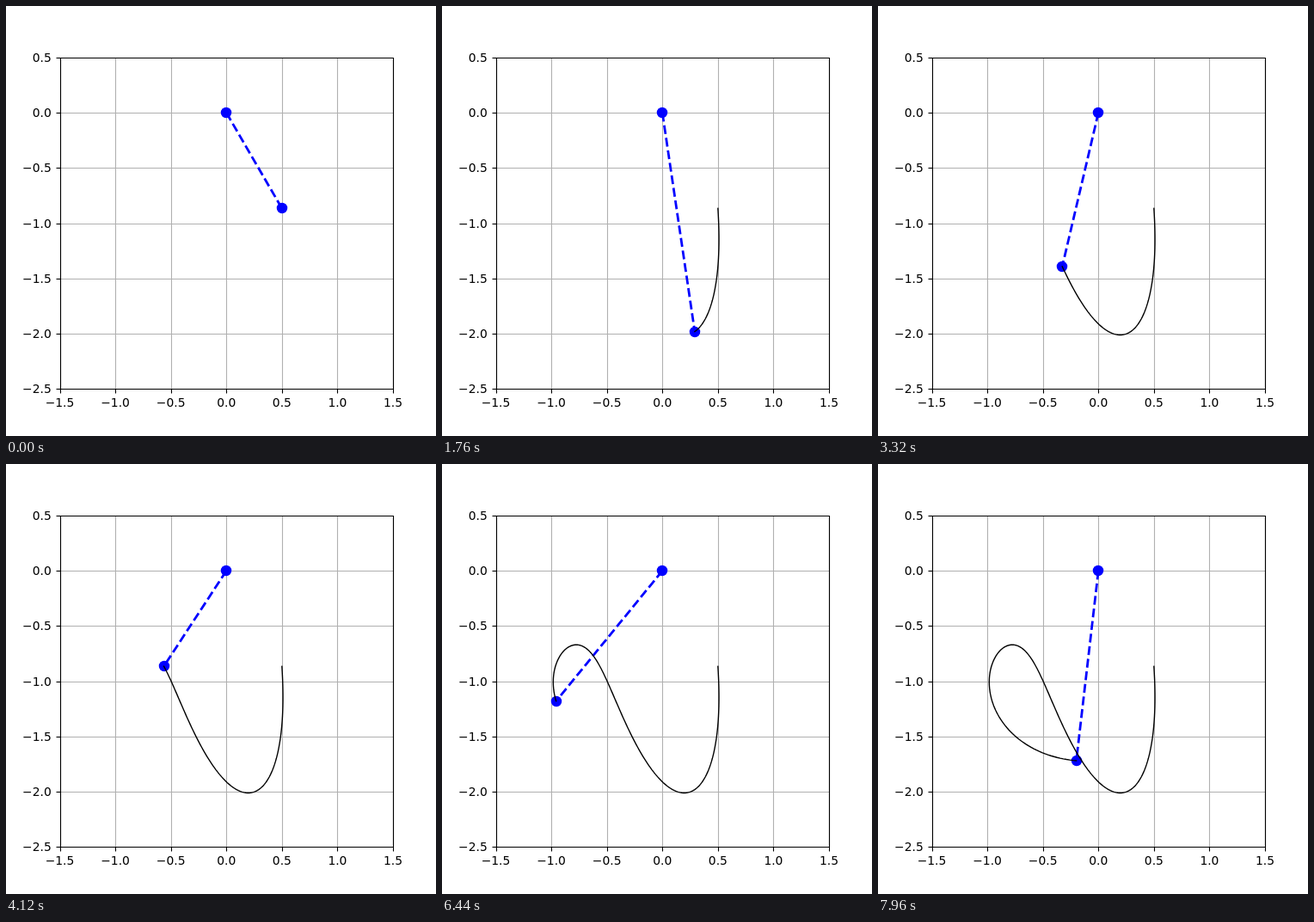
An HTML page with a canvas that plays this animation: 500 px wide and 500 px high, repeating every 8 s.

```html
<!DOCTYPE html>
<html lang="en">
<head>
<meta charset="utf-8">
<title>Spring pendulum</title>
<style>
  html, body { margin: 0; width: 100%; height: 100%; overflow: hidden; background: #fff; }
  canvas { display: block; }
</style>
</head>
<body>
<canvas id="stage" width="500" height="500"></canvas>
<script>
const ctx = document.getElementById('stage').getContext('2d');

const FRAME_MS = 40, FRAMES = 200;
const PT = 100 / 72; // pixels per point
const LEFT = 62.5, RIGHT = 450, TOP = 60, BOTTOM = 445;

const toX = x => LEFT + (x + 1.5) * (RIGHT - LEFT) / 3;
const toY = y => TOP + (0.5 - y) * (BOTTOM - TOP) / 3;
const snap = v => Math.round(v + 1e-6) + 0.5;

// Unit mass on a spring of rest length 1, integrated with velocity Verlet.
function simulate() {
  const gravity = 9.81, stiffness = 24, substeps = 20, dt = 0.01 / substeps;
  const angle = Math.PI / 6, radialSpeed = 2, angularSpeed = -1;
  const sin = Math.sin(angle), cos = Math.cos(angle);
  let x = sin, y = -cos;
  let vx = radialSpeed * sin + angularSpeed * cos;
  let vy = -radialSpeed * cos + angularSpeed * sin;

  const kick = () => {
    const pull = stiffness * (1 - 1 / Math.hypot(x, y));
    vx -= pull * x * dt / 2;
    vy -= (pull * y + gravity) * dt / 2;
  };

  const points = [];
  for (let i = 0; i < FRAMES; i++) {
    points.push([toX(x), toY(y)]);
    for (let s = 0; s < substeps; s++) {
      kick();
      x += vx * dt;
      y += vy * dt;
      kick();
    }
  }
  return points;
}

const path = simulate();
const pivot = [toX(0), toY(0)];

function line(points, color, width, dash = [], cap = 'butt') {
  ctx.strokeStyle = color;
  ctx.lineWidth = width;
  ctx.lineCap = cap;
  ctx.lineJoin = 'round';
  ctx.setLineDash(dash);
  ctx.beginPath();
  points.forEach(p => ctx.lineTo(...p));
  ctx.stroke();
}

function dot([x, y]) {
  ctx.fillStyle = '#00f';
  ctx.beginPath();
  ctx.arc(Math.round(x), Math.round(y), 4.5 * PT, 0, 2 * Math.PI);
  ctx.fill();
}

function drawAxes() {
  const thin = 0.8 * PT, tick = 5;
  const label = v => v.toFixed(1).replace('-', '\u2212');
  const left = snap(LEFT), right = snap(RIGHT), top = snap(TOP), bottom = snap(BOTTOM);
  ctx.font = `${10 * PT}px "DejaVu Sans", sans-serif`;
  ctx.textBaseline = 'alphabetic';

  for (let i = 0; i <= 6; i++) {
    const vx = -1.5 + i / 2, vy = 0.5 - i / 2;
    const x = snap(toX(vx)), y = snap(toY(vy));
    line([[x, top], [x, bottom]], '#b0b0b0', thin);
    line([[left, y], [right, y]], '#b0b0b0', thin);
    line([[x, bottom], [x, bottom + tick]], '#000', thin);
    line([[left, y], [left - tick, y]], '#000', thin);

    ctx.fillStyle = '#000';
    ctx.textAlign = 'center';
    ctx.fillText(label(vx), toX(vx), 466);
    ctx.textAlign = 'right';
    ctx.fillText(label(vy), LEFT - 7 * PT, Math.round(toY(vy) + 5));
  }
  line([[left, top], [right, top], [right, bottom], [left, bottom], [left, top]],
       '#000', thin, [], 'square');
}

function draw(now) {
  const frame = Math.floor(now / FRAME_MS) % FRAMES;
  const bob = path[frame];
  ctx.fillStyle = '#fff';
  ctx.fillRect(0, 0, 500, 500);
  drawAxes();
  line([pivot, bob], '#00f', 2 * PT, [7.4 * PT, 3.2 * PT]);
  dot(pivot);
  dot(bob);
  if (frame > 0) line(path.slice(0, frame + 1), '#000', PT, [], 'square');
}

function tick(now) {
  draw(now);
  requestAnimationFrame(tick);
}
draw(0);
requestAnimationFrame(tick);
</script>
</body>
</html>
```
